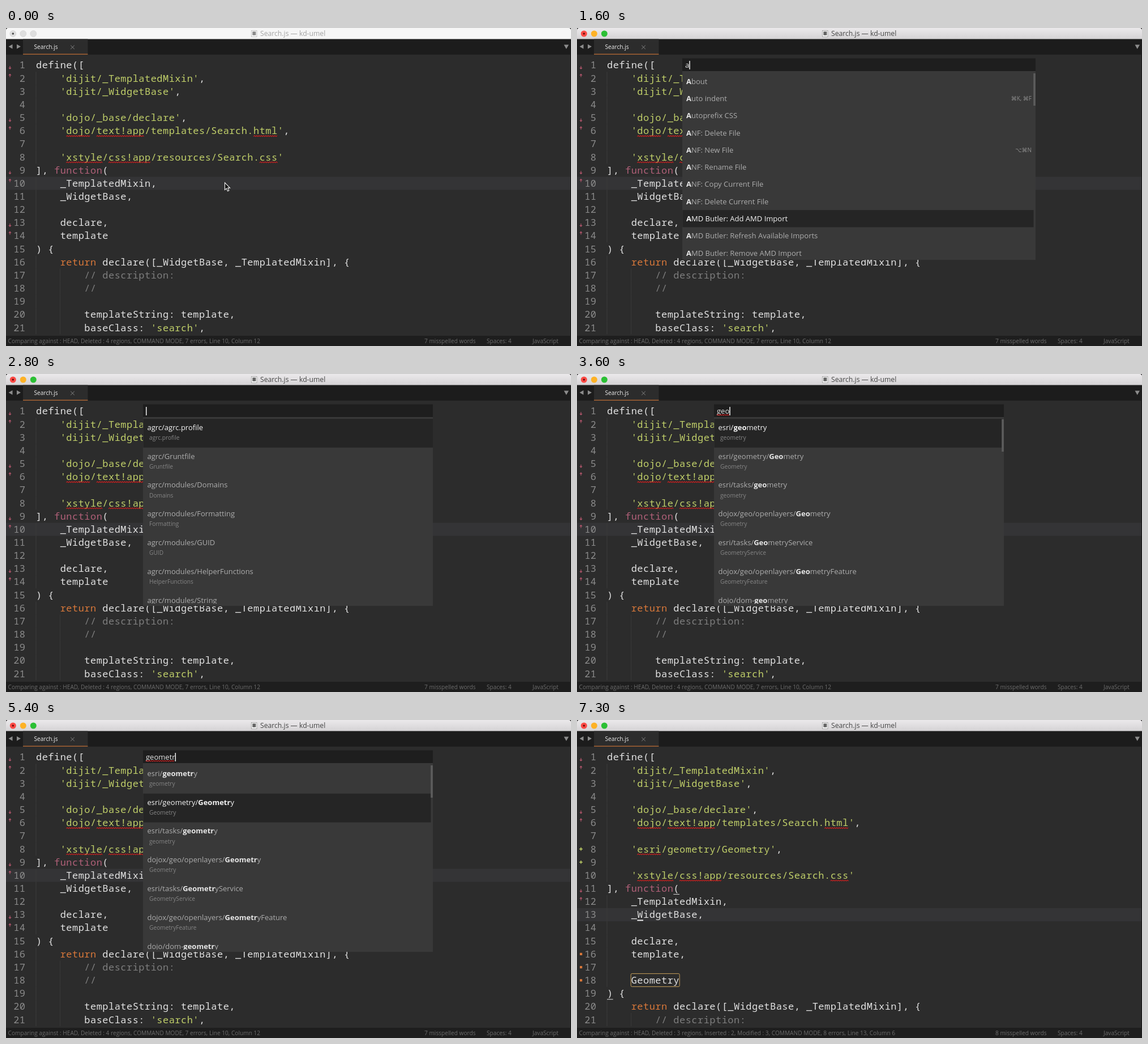
These frames come from a looping animation (998 px wide and 561 px high, 7.4 s). An HTML page:

```html
<!DOCTYPE html>
<html lang="en">
<head>
<meta charset="utf-8">
<title>Editor import demo</title>
<style>
html, body { margin: 0; width: 100%; height: 100%; overflow: hidden; background: #141414; }
svg { display: block; width: 100vw; height: 100vh; }
text { white-space: pre; font-family: "Open Sans", "DejaVu Sans", sans-serif; }
.code, .num { font: 17px "Noto Sans Mono", monospace; letter-spacing: .467px; fill: #e2e2e2; }
.num { fill: #8b8b8b; text-anchor: end; }
.str { fill: #c0cf69; }
.fn { fill: #b06078; }
.kw { fill: #d9783a; }
.com { fill: #7d7d7d; }
.row { font-size: 13px; fill: #adadad; }
.row .hit { font-weight: 700; fill: #e6e6e6; }
.row.on, .row.on .hit { fill: #f4f4f4; }
.sub { font-size: 10.2px; fill: #858585; }
.hint { font-size: 10px; fill: #8d8d8d; text-anchor: end; }
.status { font-size: 10.15px; fill: #6c6c6c; }
.input { font-size: 13px; fill: #e6e6e6; }
</style>
</head>
<body>
<svg id="stage" viewBox="0 0 998 561" preserveAspectRatio="none"></svg>
<script>
const LOOP = 7400, PITCH = 23.16, CHAR = 10.667, LEFT = 53;
const stage = document.getElementById('stage');
const pen = document.createElement('canvas').getContext('2d');

const head = `define([
    'dijit/_TemplatedMixin',
    'dijit/_WidgetBase',

    'dojo/_base/declare',
    'dojo/text!app/templates/Search.html',
`;
const tail = `    'xstyle/css!app/resources/Search.css'
], function(
    _TemplatedMixin,
    _WidgetBase,

    declare,
    template`;
const body = `
) {
    return declare([_WidgetBase, _TemplatedMixin], {
        // description:
        //

        templateString: template,
        baseClass: 'search',`;

const before = {
  lines: `${head}\n${tail}${body}`.split('\n'),
  row: 10, col: 11, open: 9, close: 15,
  down: [1, 5, 9, 13], up: [2, 6, 10, 14], added: [], changed: [],
  status: () => 'Comparing against : HEAD, Deleted : 4 regions, COMMAND MODE, 7 errors, Line 10, Column 12',
  words: 7
};
const after = {
  lines: `${head}\n    'esri/geometry/Geometry',\n\n${tail},\n\n    Geometry${body}`.split('\n').slice(0, 21),
  row: 13, col: 5, open: 11, close: 19,
  down: [1, 5, 11], up: [2, 6, 12], added: [8, 9], changed: [16, 17, 18],
  status: n => `Comparing against : HEAD, Deleted : 3 regions, Inserted : 2, Modified : 3, COMMAND MODE, ${n} errors, Line 13, Column 6`,
  words: 8
};

const addImport = 'AMD Butler: Add AMD Import', refresh = 'AMD Butler: Refresh Available Imports',
  remove = 'AMD Butler: Remove AMD Import', sort = 'AMD Butler: Sort AMD Imports',
  channel = 'Package Control: Add Channel', advanced = 'Package Control: Advanced Install Package',
  scheme = 'Schemr: Add current scheme to favorites', theme = 'Themr: Add current theme to favorites',
  sync = 'Package Syncing: Define Sync Folder';
const files = ['ANF: Delete File', 'ANF: New File|⌥⌘N', 'ANF: Rename File', 'ANF: Copy Current File', 'ANF: Delete Current File'];
const common = ['About', 'Auto indent|⌘K, ⌘F', 'Autoprefix CSS'];
const allRows = [addImport, refresh, remove, sort, ...files, ...common];
const aRows = [...common, ...files, addImport, refresh, remove];
const addRows = ['Project: Add Folder', channel, 'Package Control: Add Repository', addImport,
  'Gist: Add File to Gist|⌘K, ⌘]', scheme, theme, advanced, sort, remove, sync];
const narrowRows = [addImport, channel, scheme, theme, sort, remove, sync, advanced];
const lastRows = [addImport, sort, remove, scheme, theme, channel];

const mod = 'agrc/modules/', layers = 'dojox/geo/openlayers/';
const modules = ['agrc/agrc.profile', 'agrc/Gruntfile', ...['Domains', 'Formatting', 'GUID', 'HelperFunctions', 'String'].map(n => mod + n)];
const gRows = modules.filter(n => !/Domains|Helper/.test(n)).concat('esri/geometry', 'esri/graphic');
const geoRows = ['esri/geometry', 'esri/geometry/Geometry', 'esri/tasks/geometry', layers + 'Geometry',
  'esri/tasks/GeometryService', layers + 'GeometryFeature', 'dojo/dom-geometry'];

const palette = { x: 186, w: 624, pitch: 30.27, pad: 7, input: 191 };
const quick = { x: 242, w: 512, pitch: 50.8, pad: 7.5, input: 247, sub: true };

// Each step changes part of the state and keeps the rest.
const steps = [
  [0, { doc: before, active: false, focus: false, caret: 0, panel: null, errors: 7 }],
  [100, { active: true, focus: true, caret: 1 }],
  [600, { caret: .65 }], [700, { caret: .3 }], [800, { caret: 0 }],
  [1200, { panel: palette, focus: false, caret: 1, q: '', rows: allRows, sel: 0, thumb: 0 }],
  [1600, { q: 'a', rows: aRows, sel: 8, thumb: 57 }],
  [1800, { q: 'ad', rows: addRows, sel: 3, thumb: 120 }],
  [1900, { q: 'add', thumb: 189 }],
  [2100, { q: 'add ', rows: narrowRows, sel: 0, thumb: 0 }],
  [2200, { q: 'add a' }],
  [2400, { q: 'add am', rows: lastRows }],
  [2800, { panel: quick, q: '', rows: modules, sel: 0 }],
  [3200, { q: 'g', rows: gRows, thumb: 57 }],
  [3400, { q: 'ge', rows: geoRows }],
  [3600, { q: 'geo' }], [3700, { q: 'geom' }], [3800, { q: 'geome' }],
  [4000, { q: 'geomet' }], [4200, { q: 'geometr' }],
  [4600, { caret: 0 }], [4800, { caret: 1, thumb: 0 }],
  [5200, { caret: 0 }], [5300, { sel: 1, thumb: 57 }], [5400, { caret: 1 }], [5600, { caret: 0 }],
  [5800, { doc: after, panel: null, focus: true, caret: 1 }],
  [6100, { caret: .65 }], [6200, { caret: .3 }], [6300, { caret: 0 }], [6400, { caret: 1 }],
  [6800, { caret: .65, errors: 8 }], [6900, { caret: .3 }], [7000, { caret: 0 }],
  [7300, { caret: 1 }]
];

const top_ = n => 54 + (n - 1) * PITCH;
const colX = c => LEFT + c * CHAR;
const rect = (x, y, w, h, fill, more = '') => `<rect x="${x}" y="${y}" width="${w}" height="${h}" fill="${fill}" ${more}/>`;
const path = (d, fill, more = '') => `<path d="${d}" fill="${fill}" ${more}/>`;
const text = (x, y, cls, s, more = '') => `<text x="${x}" y="${y}" class="${cls}" ${more}>${s}</text>`;
const span = (cls, s) => `<tspan class="${cls}">${s}</tspan>`;

function squiggle(x, y, w) {
  let d = `M${x} ${y}`;
  for (let i = 2, up = 1; i <= w; i += 2, up = -up) d += `l2 ${-1.6 * up}`;
  return path(d, 'none', 'stroke="#c41f1f" stroke-width="1.2"');
}

function chrome(s) {
  const lights = s.active ? ['#fc4a45', '#fdb226', '#2bc034'] : ['#dedede', '#dedede', '#dedede'];
  const ink = s.active ? '#454545' : '#a3a3a3';
  let out = path('M0 20V4Q0 0 4 0H994Q998 0 998 4V20Z', s.active ? 'url(#bar)' : '#f6f6f6');
  lights.forEach((c, i) => {
    out += `<circle cx="${12.3 + i * 18}" cy="10" r="5.5" fill="${c}"${s.active ? '' : ' stroke="#cfcfcf" stroke-width=".6"'}/>`;
  });
  out += `<circle cx="12.3" cy="10" r="1.8" fill="${s.active ? '#6d0d0b' : '#4c4c4c'}"/>`;
  out += rect(433.5, 4.5, 9.5, 11, '#fafafa', `stroke="${s.active ? '#999' : '#bbb'}" stroke-width=".8"`);
  out += rect(435.3, 6.3, 6, 6.5, s.active ? '#666' : '#8c8c8c');
  out += text(449, 14.3, '', 'Search.js — kd-umel', `font-size="12.2" fill="${ink}"`);
  out += rect(0, 19.5, 998, 27.5, '#1c1c1c') + rect(30, 19.5, 114.5, 26, '#2c2c2c') + rect(30, 45.6, 114.5, 1.2, '#c9753b');
  out += path('M4.5 32.7L11.5 28.7V36.7ZM26 32.7L19 28.7V36.7ZM985.5 29.5H994L989.7 37Z', '#8c8c8c');
  out += text(49.5, 36.6, '', 'Search.js', 'font-size="10.2" fill="#ededed"');
  return out + path('M114.2 30.6l6.6 6.6m0-6.6l-6.6 6.6', 'none', 'stroke="#868686" stroke-width="1"');
}

const paint = line => line.replace(/'[^']*'|\/\/.*|\bfunction\b|\breturn\b/g, m =>
  span(m[0] === "'" ? 'str' : m[0] === '/' ? 'com' : m === 'return' ? 'kw' : 'fn', m));

function codeLine(line, i, s) {
  const n = i + 1, t = top_(n), guide = x => rect(x, t, 1, PITCH, '#3b3b3b');
  const flat = n === 1 || n === s.doc.open || n === s.doc.close;
  let out = flat ? '' : guide(52.5);
  if (n > s.doc.close + 1) out += guide(95.2);
  out += text(34.5, t + 17.4, 'num', n) + text(LEFT, t + 17.4, 'code', paint(line));
  if (/!|esri/.test(line)) {
    for (const m of line.matchAll(/dojo|text!app|html|xstyle|css!app|css|esri/g))
      out += squiggle(colX(m.index), t + 21.6, m[0].length * CHAR);
  }
  return out;
}

function gutter(d) {
  const arrow = (y, k) => path(`M4.3 ${y}h5.4l-2.7 ${3 * k}zM6.4 ${y}h1.2v${-3 * k}h-1.2z`, '#b4566c');
  return d.down.map(n => arrow(top_(n) + 16, 1)).join('')
    + d.up.map(n => arrow(top_(n) + 6.4, -1)).join('')
    + d.added.map(n => path(`M4.2 ${top_(n) + 11.5}h5.6m-2.8-2.8v5.6`, 'none', 'stroke="#b9c964" stroke-width="1.6"')).join('')
    + d.changed.map(n => rect(5, top_(n) + 9.4, 4.2, 4.2, '#d9783a')).join('');
}

function editor(s) {
  const d = s.doc;
  let out = rect(0, 47, 997, 496, '#2c2c2c') + rect(0, top_(d.row), 997, PITCH, '#343436');
  out += d.lines.map((line, i) => codeLine(line, i, s)).join('') + gutter(d);
  if (s.focus) {
    out += rect(colX(11), top_(d.open + 1) - 1.8, CHAR, 1.1, '#cfcfcf') + rect(LEFT, top_(d.close + 1) - 1.8, CHAR, 1.1, '#cfcfcf');
    out += rect(colX(d.col), top_(d.row + 1) - 2.6, CHAR, 1.9, '#f4f4f4', `opacity="${s.caret}"`);
  }
  if (s.errors === 8) out += rect(95.2, 447.4, 86, 23, 'none', 'rx="2" stroke="#c8a05a" stroke-width="1"');
  out += rect(0, 543, 998, 18, '#1e1e1e') + text(3.5, 555.8, 'status', d.status(s.errors));
  out += text(739, 555.8, 'status', d.words + ' misspelled words');
  return out + text(849, 555.8, 'status', 'Spaces: 4') + text(930, 555.8, 'status', 'JavaScript');
}

// Marks the matched letters: a whole run if there is one, else letter by letter.
function mark(name, q, last) {
  if (!q) return name;
  const low = name.toLowerCase(), run = last ? low.lastIndexOf(q) : low.indexOf(q);
  const scan = from => {
    const hits = [];
    for (const c of q) {
      const at = low.indexOf(c, from);
      if (at < 0) return null;
      hits.push(at);
      from = at + 1;
    }
    return hits;
  };
  const starts = [...low.matchAll(/\b\w/g)].map(m => m.index).filter(i => low[i] === q[0]);
  const hits = run >= 0 ? [...q].map((c, i) => run + i) : starts.map(scan).find(Boolean) || scan(0) || [];
  return [...name].map((c, i) => hits.includes(i) ? span('hit', c) : c).join('')
    .replace(/<\/tspan><tspan class="hit">/g, '');
}

function panel(s) {
  const p = s.panel, right = p.x + p.w;
  const h = Math.min(330, s.rows.length * p.pitch + 3);
  let out = rect(p.x, 53.5, p.w, 23, '#1e1e1e') + rect(p.x, 76, p.w, h + 3, '#393939');
  out += text(p.input, 70.3, 'input', s.q);
  pen.font = '13px "Open Sans", "DejaVu Sans", sans-serif';
  const w = pen.measureText(s.q).width;
  if (p.sub && s.q.length > 2) out += squiggle(p.input, 73, w);
  if (s.caret) out += rect(p.input + w, 58, 1.5, 15, '#f2f2f2');
  out += '<g clip-path="url(#list)">';
  s.rows.forEach((row, i) => {
    const [name, hint] = row.split('|'), y = 79 + i * p.pitch;
    if (i === s.sel) out += rect(p.x + .5, y, p.w - (s.thumb ? 4 : .5), p.pitch, '#252525');
    out += text(p.x + p.pad, y + 19.8, i === s.sel ? 'row on' : 'row', mark(name, s.q, p.sub));
    if (p.sub) out += text(p.x + 11, y + 37, 'sub', name.split('/').pop());
    if (hint) out += text(803, y + 19, 'hint', hint);
  });
  out += '</g>';
  return s.thumb ? out + rect(right - 3.8, 80, 3.6, s.thumb, '#5c5c5c') : out;
}

const defs = `<defs><linearGradient id="bar" x2="0" y2="1"><stop stop-color="#ebe9eb"/><stop offset="1" stop-color="#d4d2d4"/></linearGradient>
<clipPath id="list"><rect x="180" y="79" width="640" height="326"/></clipPath></defs>`;
const pointer = path('M386.5 272.8V285.6L389.4 282.9L391.5 287.8L393.8 286.8L391.7 282.1H395.6Z', '#111', 'stroke="#f5f5f5" stroke-width="1.1"');

let shown = -1;
function draw(t) {
  const at = steps.findLastIndex(([from]) => from <= t);
  if (at === shown) return;
  shown = at;
  const s = Object.assign({}, ...steps.slice(0, at + 1).map(step => step[1]));
  stage.innerHTML = defs + editor(s) + chrome(s) + (s.panel ? panel(s) : '') + (s.active ? '' : pointer);
}

const start = performance.now();
function tick() {
  draw((performance.now() - start) % LOOP);
  requestAnimationFrame(tick);
}
tick();
</script>
</body>
</html>
```
